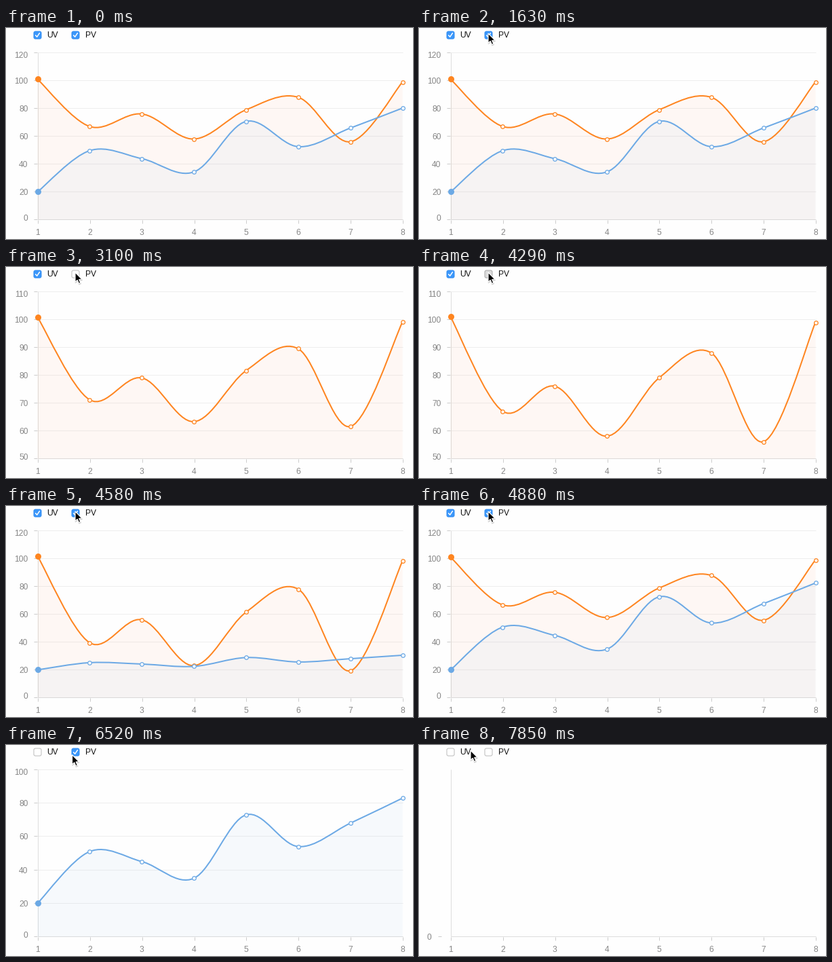
Animation, 600 px wide and 311 px high, one loop 8 s. Source, as a matplotlib script:

```python
import matplotlib.pyplot as plt
import numpy as np
from matplotlib.animation import FuncAnimation
from matplotlib.collections import LineCollection
from matplotlib.patches import FancyBboxPatch, PathPatch, Polygon
from matplotlib.path import Path

WIDTH, HEIGHT, DPI = 600, 311, 100
LOOP_MS, INTERVAL = 8000, 20
LEFT, RIGHT, TOP, BOTTOM = 47, 585, 37, 283
ORANGE, BLUE, TEXT = "#fe8520", "#6ca9e5", "#868686"

UV = np.array([101, 67, 76, 58, 79, 88, 56, 99])
PV = np.array([20, 51, 45, 35, 73, 54, 68, 83])
XS = np.linspace(LEFT, RIGHT, 8)

# Shown from, click time, (low, high, tick step), UV shown, PV shown
PHASES = [
    (0, -383, (0, 120, 20), True, True),
    (2950, 2810, (50, 110, 10), True, False),
    (4440, 4460, (0, 120, 20), True, True),
    (5780, 5654, (0, 100, 20), False, True),
    (6960, 6960, None, False, False),
]
DURATION = 450
REDRAWS = [0, 2950, 3100, 3240, 4440, 4590, 4730, 4880, 5030,
           5780, 5930, 6080, 6230, 6960]

# Shown from, cursor kind, tip position
CURSOR = [
    (0, None, 0, 0),
    (1200, "arrow", 96, -9), (1340, "arrow", 99, 0),
    (1480, "arrow", 101, 6), (1630, "arrow", 102.5, 8.5),
    (5030, "arrow", 93, 9), (5180, "hand", 73, 14), (5330, "hand", 66, 15),
    (6380, "hand", 70, 15), (6520, "arrow", 98, 15), (6670, "hand", 111, 17),
    (7850, "arrow", 76.5, 8.5),
]
PRESSES = [(2800, 2950), (4290, 4440)]


def px(n):
    return n * 72 / DPI


def latest(rows, t):
    return max(i for i, row in enumerate(rows) if row[0] <= t)


def ease(u):
    u = min(max(u, 0), 1)
    return 2 * u * u if u < 0.5 else 1 - 2 * (1 - u) ** 2


def to_y(values, scale):
    low, high, _ = scale
    return BOTTOM - (values - low) / (high - low) * (BOTTOM - TOP)


def smooth_path(ys):
    """Uniform Catmull-Rom spline, with the end points doubled."""
    pts = np.column_stack([XS, ys])
    padded = np.vstack([pts[:1], pts, pts[-1:]])
    handles = (padded[2:] - padded[:-2]) / 6
    verts = [pts[0]]
    for i in range(len(pts) - 1):
        verts += [pts[i] + handles[i], pts[i + 1] - handles[i + 1], pts[i + 1]]
    return verts, [Path.MOVETO] + [Path.CURVE4] * (len(verts) - 1)


fig = plt.figure(figsize=(WIDTH / DPI, HEIGHT / DPI), dpi=DPI, facecolor="#fefefe")
ax = fig.add_axes([0, 0, 1, 1])
# Whole numbers are pixel centres, counted from one
ax.set_xlim(0.5, WIDTH + 0.5)
ax.set_ylim(HEIGHT + 0.5, 0.5)
ax.axis("off")


def text(x, y, s, color=TEXT, ha="center"):
    return ax.text(x, y, s, color=color, ha=ha, va="baseline",
                   family="Liberation Sans", fontsize=px(12))


def segments(color, z, segs=()):
    lines = LineCollection(list(segs), colors=color, linewidths=px(1), zorder=z)
    ax.add_collection(lines)
    return lines


class Series:
    def __init__(self, values, color, fill, z):
        self.values = values
        empty = Path([(0, 0)])
        self.area = PathPatch(empty, fc=fill, ec="none", alpha=0.05, zorder=z)
        self.line = PathPatch(empty, fc="none", ec=color, lw=px(2), zorder=z + 2)
        ax.add_patch(self.area)
        ax.add_patch(self.line)
        self.dots, = ax.plot([], [], "o", ms=px(5.6), mew=px(1.3),
                             mfc="white", mec=color, zorder=z + 2.1)
        self.first, = ax.plot([], [], "o", ms=px(9), mew=0, mfc=color, zorder=z + 2.2)
        self.artists = [self.area, self.line, self.dots, self.first]

    def draw(self, shown, ys):
        for artist in self.artists:
            artist.set_visible(shown)
        if not shown:
            return
        verts, codes = smooth_path(ys)
        self.line.set_path(Path(verts, codes))
        base = [(RIGHT, BOTTOM), (LEFT, BOTTOM), verts[0]]
        self.area.set_path(Path(verts + base, codes + [Path.LINETO] * 3))
        self.dots.set_data(XS[1:], ys[1:])
        self.first.set_data(XS[:1], ys[:1])


class Checkbox:
    def __init__(self, x, label):
        self.box = FancyBboxPatch((x - 5.5, 5.5), 11, 11, lw=px(1), zorder=8,
                                  boxstyle="round,pad=0,rounding_size=2.4")
        ax.add_patch(self.box)
        self.mark, = ax.plot([x - 2.8, x - 0.8, x + 2.8], [11.4, 13.6, 8.2],
                             color="white", lw=px(1.5), zorder=9)
        text(x + 14, 15, label, "#111111", "left")

    def draw(self, checked, pressed):
        if checked:
            face, edge = ("#1a6fd8", "#1661c0") if pressed else ("#3b97fa", "#2f8bf2")
        else:
            face, edge = ("#dcdcdc", "#a8a8a8") if pressed else ("white", "#bcbcbc")
        self.box.set_facecolor(face)
        self.box.set_edgecolor(edge)
        self.mark.set_visible(checked)


class Cursor:
    def __init__(self, outline, face, edge, creases=()):
        self.outline = np.array(outline)
        self.creases = np.array(creases)
        self.shadow = Polygon(self.outline, fc="black", ec="black", lw=px(1.5),
                              alpha=0.15, zorder=18)
        self.shape = Polygon(self.outline, fc=face, ec=edge, lw=px(1.2),
                             joinstyle="round", zorder=20)
        ax.add_patch(self.shadow)
        ax.add_patch(self.shape)
        self.lines = segments("black", 21)
        self.artists = [self.shadow, self.shape, self.lines]

    def draw(self, shown, x, y):
        for artist in self.artists:
            artist.set_visible(shown)
        self.shape.set_xy(self.outline + (x, y))
        self.shadow.set_xy(self.outline + (x + 0.3, y + 1.2))
        if len(self.creases):
            self.lines.set_segments(self.creases + (x, y))


grid = segments("#eeeeee", 1)
y_ticks = segments("#cccccc", 2)
segments("#dddddd", 2, [[(LEFT, TOP), (LEFT, BOTTOM)], [(LEFT, BOTTOM), (RIGHT, BOTTOM)]])
segments("#cccccc", 2, [[(x, 284), (x, 289)] for x in np.round(XS)])
for number, x in enumerate(XS, 1):
    text(x, 306, str(number))
y_labels = [text(33, 0, "", ha="right") for _ in range(7)]

uv_series = Series(UV, ORANGE, "#ff8040", 3)
pv_series = Series(PV, BLUE, BLUE, 3.5)
uv_box, pv_box = Checkbox(47, "UV"), Checkbox(103, "PV")
cursors = {
    "arrow": Cursor([(0, 0), (0, 14.3), (3.2, 11.3), (5.5, 16.4), (7.9, 15.4),
                     (5.7, 10.4), (10.1, 10.2)], "black", "white"),
    "hand": Cursor([(-1.6, 1), (0, -0.4), (1.5, 1), (2, 5.8), (3.2, 5), (4.4, 6.2),
                    (5.6, 5.6), (6.7, 7), (8, 6.8), (9, 8.4), (8.8, 12), (7.5, 14.5),
                    (7.3, 16), (0.4, 16), (-0.2, 14.4), (-3, 11), (-5, 8.4),
                    (-4, 7), (-1, 9)], "white", "black",
                   [[(x, 10.5), (x, 13.5)] for x in (2, 4, 6)]),
}


def draw_axis(scale):
    if scale is None:
        values, ys, label_ys, right = [0], [BOTTOM], [BOTTOM], 19
        grid.set_segments([])
        y_ticks.set_segments([[(28, BOTTOM), (33, BOTTOM)]])
    else:
        low, high, step = scale
        values = np.arange(low, high + 1, step)
        ys = np.round(to_y(values, scale))
        label_ys, right = np.clip(ys, 40, 280), 33
        grid.set_segments([[(LEFT, y), (RIGHT, y)] for y in ys[1:]])
        y_ticks.set_segments([[(41, y), (46, y)] for y in ys])
    for i, label in enumerate(y_labels):
        label.set_visible(i < len(values))
        if i < len(values):
            label.set_text(str(values[i]))
            label.set_position((right, label_ys[i] + 4.4))


def positions(series, index, shown_before, progress):
    scale = PHASES[index][2]
    if scale is None:
        return None
    end = to_y(series.values, scale)
    if shown_before:
        start = to_y(series.values, PHASES[index - 1][2])
    else:
        start = np.full(len(end), end[0])  # new lines rise out of a flat one
    return start + (end - start) * progress


def update(frame):
    t = frame * INTERVAL + INTERVAL / 2
    index = latest(PHASES, t)
    _, click, scale, uv_on, pv_on = PHASES[index]
    drawn = max(r for r in REDRAWS if r <= t)
    progress = ease((drawn - click) / DURATION)

    draw_axis(scale)
    if index == 0:
        # The loop opens with UV settled and PV held near the end of its rise
        uv_series.draw(True, to_y(UV, scale))
        pv_series.draw(True, positions(pv_series, 0, False, progress))
    else:
        uv_before, pv_before = PHASES[index - 1][3:]
        uv_series.draw(uv_on, positions(uv_series, index, uv_before, progress))
        pv_series.draw(pv_on, positions(pv_series, index, pv_before, progress))

    uv_box.draw(uv_on, False)
    pv_box.draw(pv_on, any(a <= t < b for a, b in PRESSES))
    _, kind, x, y = CURSOR[latest(CURSOR, t)]
    for name, cursor in cursors.items():
        cursor.draw(name == kind, x, y)
    return []


anim = FuncAnimation(fig, update, frames=LOOP_MS // INTERVAL, interval=INTERVAL,
                     init_func=lambda: [], repeat=True, repeat_delay=0)
plt.show()
```
